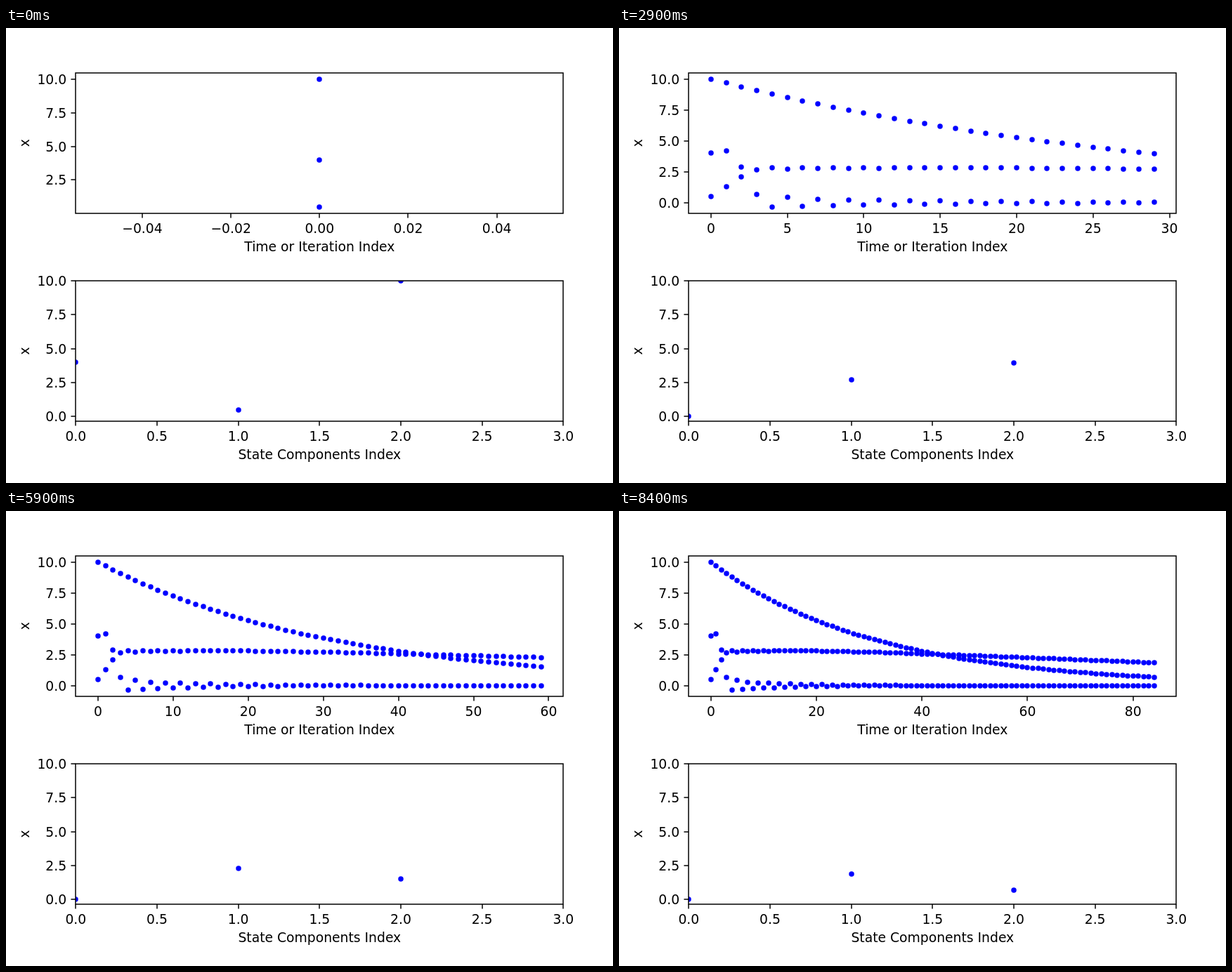
An HTML page with a canvas for the animation above (8.5 s loop, 864 by 648 pixels).

```html
<!DOCTYPE html>
<html lang="en">
<head>
<meta charset="utf-8">
<title>State trajectory</title>
<style>
  html, body { margin: 0; width: 100%; height: 100%; overflow: hidden; background: #fff; }
  canvas { display: block; }
</style>
</head>
<body>
<canvas id="stage" width="864" height="648"></canvas>
<script>
const ctx = document.getElementById('stage').getContext('2d');
const STEPS = 85, STEP_MS = 100;
const LEFT = 99.3, RIGHT = 793.3;
const PT = 1.875; // pixels per typographic point
const TICK = 3.5 * PT, LINE = 0.8 * PT, DOT = 3.75;

// First states before the trajectory settles into its regular pattern.
const START = [[4, 0.5], [4.17, 1.285], [2.905, 2.1], [0.672, 2.638], [-0.353, 2.798], [0.414, 2.714]];
// Slow trend of the second component: [step, value].
const TREND = [[4, 2.762], [8, 2.78], [13, 2.813], [18, 2.81], [23, 2.775], [29, 2.72],
  [37, 2.609], [51, 2.402], [66, 2.152], [84, 1.848]];

function trend(n) {
  const i = TREND.findIndex(([step]) => step >= n);
  const [n0, v0] = TREND[i - 1], [n1, v1] = TREND[i];
  return v0 + (v1 - v0) * (n - n0) / (n1 - n0);
}

function state(n) {
  const third = 10 * Math.exp(-0.032 * n);
  if (n < START.length) return [...START[n], third];
  const swing = 0.28 * Math.exp(-0.095 * (n - 7) - (n / 36) ** 8);
  const first = n % 2 ? swing : -swing;
  return [first, trend(n) - 0.1 * first, third];
}

const states = Array.from({ length: STEPS }, (_, n) => state(n));
const lowest = Math.min(...states.flat());

function withMargin(lo, hi) {
  const pad = 0.05 * (hi - lo);
  return [lo - pad, hi + pad];
}

function ticks([lo, hi], bins) {
  const raw = (hi - lo) / bins;
  const power = 10 ** Math.floor(Math.log10(raw));
  const step = [1, 2, 2.5, 5, 10].map(m => m * power).find(s => s >= raw - 1e-9);
  const decimals = (String(+step.toPrecision(6)).split('.')[1] || '').length;
  const list = [];
  for (let i = Math.ceil(lo / step - 1e-9); i * step <= hi + 1e-9; i++) {
    list.push([i * step, (i * step).toFixed(decimals).replace('-', '\u2212')]);
  }
  return list;
}

function line(x0, y0, x1, y1) {
  ctx.beginPath();
  ctx.moveTo(x0, y0);
  ctx.lineTo(x1, y1);
  ctx.stroke();
}

function label(text, x, y, align = 'center') {
  ctx.textAlign = align;
  ctx.fillText(text, x, y);
}

function plot({ top, bottom, xlim, ylim, xBins, title, points }) {
  const px = x => LEFT + (x - xlim[0]) / (xlim[1] - xlim[0]) * (RIGHT - LEFT);
  const py = y => bottom - (y - ylim[0]) / (ylim[1] - ylim[0]) * (bottom - top);
  const [l, r, t, b] = [LEFT, RIGHT, top, bottom].map(Math.round);

  ctx.save();
  ctx.beginPath();
  ctx.rect(l, t, r - l, b - t);
  ctx.clip();
  ctx.fillStyle = '#00f';
  for (const [x, y] of points) {
    ctx.beginPath();
    ctx.arc(Math.round(px(x)), Math.round(py(y)), DOT, 0, 2 * Math.PI);
    ctx.fill();
  }
  ctx.restore();

  ctx.fillStyle = ctx.strokeStyle = '#000';
  ctx.lineWidth = LINE;
  ctx.strokeRect(l, t, r - l, b - t);
  for (const [value, text] of ticks(xlim, xBins)) {
    const x = Math.round(px(value));
    line(x, b, x, b + TICK);
    label(text, px(value), b + 28);
  }
  for (const [value, text] of ticks(ylim, 5)) {
    const y = Math.round(py(value));
    line(l, y, l - TICK, y);
    label(text, LEFT - 2 * TICK, y + 7, 'right');
  }
  label(title, (LEFT + RIGHT) / 2, b + 54);
  ctx.save();
  ctx.translate(33, (top + bottom) / 2);
  ctx.rotate(-Math.PI / 2);
  label('x', 0, 0);
  ctx.restore();
}

function draw(n) {
  ctx.fillStyle = '#fff';
  ctx.fillRect(0, 0, 864, 648);
  ctx.font = `${10 * PT}px "DejaVu Sans", sans-serif`;
  const shown = states.slice(0, n + 1);
  plot({
    top: 63.7, bottom: 263.9, xBins: 9, title: 'Time or Iteration Index',
    xlim: n ? withMargin(0, n) : [-0.055, 0.055],
    ylim: withMargin(Math.min(...shown.flat()), 10),
    points: shown.flatMap((values, i) => values.map(v => [i, v]))
  });
  plot({
    top: 359.9, bottom: 560, xBins: 9, title: 'State Components Index',
    xlim: [0, 3], ylim: [lowest, 10],
    points: states[n].map((v, i) => [i, v])
  });
}

function tick() {
  draw(Math.floor(performance.now() / STEP_MS) % STEPS);
  requestAnimationFrame(tick);
}
tick();
</script>
</body>
</html>
```
